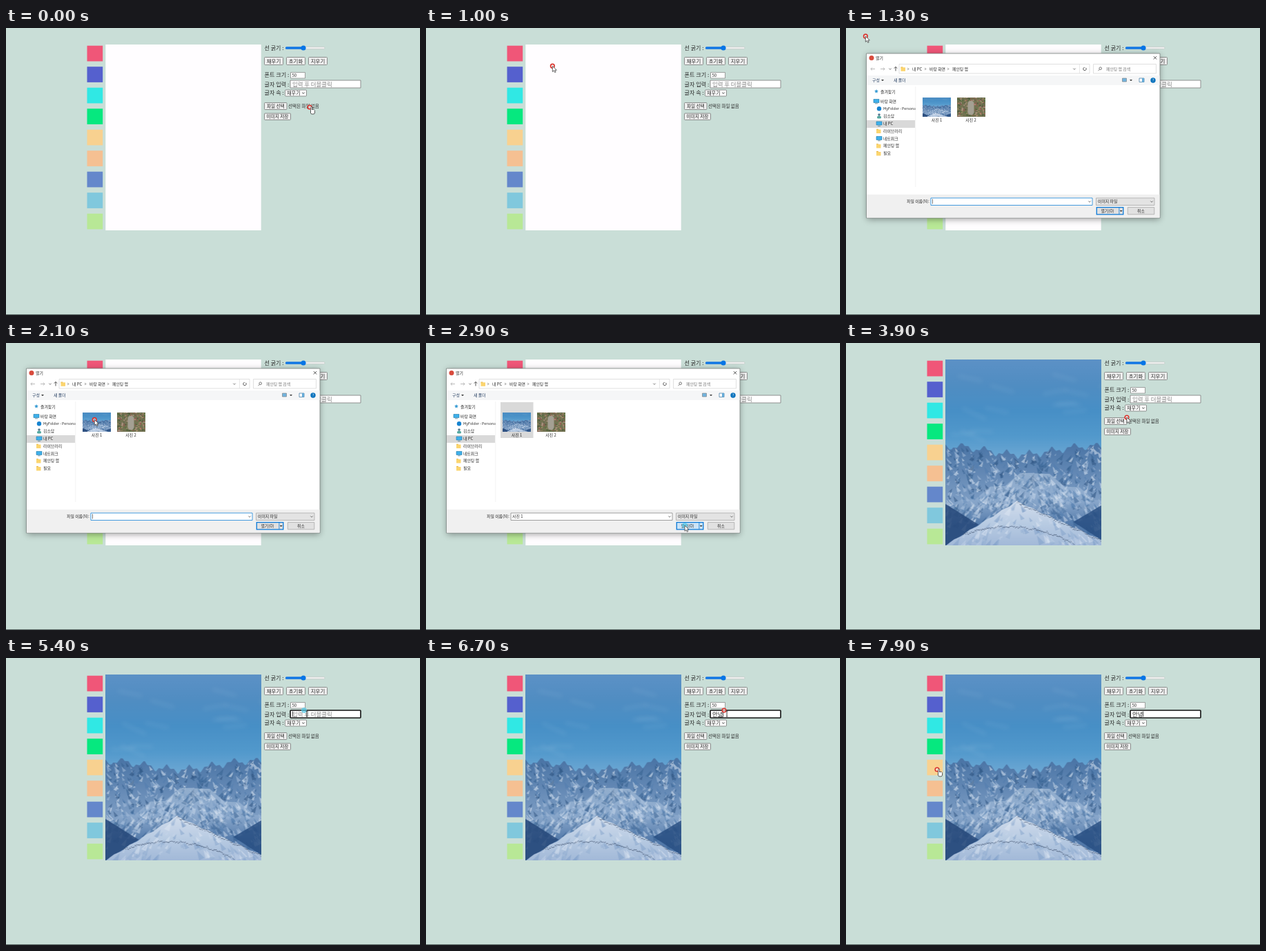
Write an HTML page with a canvas that moves like this. It is 600x417 px and loops after 8 s.

```html
<!DOCTYPE html>
<html lang="ko">
<head>
<meta charset="utf-8">
<title>그림판</title>
<style>
html, body { margin: 0; width: 100%; height: 100%; overflow: hidden; background: #c9ded7; }
canvas { display: block; }
</style>
</head>
<body>
<canvas id="stage" width="600" height="417"></canvas>
<script>
const LOOP = 8000;
const FONT = '"Noto Sans CJK KR", "Noto Sans CJK", "Noto Sans", sans-serif';
const INK = '#2a2a2a';
const SMALL = 5.9;
const SWATCHES = ['#f05678', '#5560ce', '#30e8e4', '#06e87f', '#f8d190',
  '#f5c092', '#6487cb', '#80c8dd', '#b8e896'];
const KEYSTROKES = ['ㅇ', '아', '안', '안ㄴ', '안녀', '안녕'];

const DIALOG_OPEN = 1100, SELECT = 2300, PRESS = 2800, DIALOG_CLOSE = 3100, LOADED = 3200;
const FOCUS = 5300, FIRST_SYLLABLE = 6000, SECOND_SYLLABLE = 6500, LEAVE = 7200;
const CLICKS = [700, SELECT, PRESS + 100, FOCUS + 100];

// Pointer stops; each leg decelerates into its stop.
const STOPS = [
  { at: 0, x: 440, y: 115 },
  { at: 800, x: 390, y: 113 },
  { at: 1400, x: 18, y: 9 },
  { at: 2200, x: 130, y: 113 },
  { at: 2900, x: 375, y: 265 },
  { at: 3900, x: 407, y: 108 },
  { at: FOCUS, x: 432, y: 76 },
  { at: LEAVE, x: 432, y: 76 },
  { at: 7900, x: 132, y: 162 }
];

const stage = document.getElementById('stage').getContext('2d');
let ctx = stage;

function paint(fill, line, width = 0.8) {
  if (fill) { ctx.fillStyle = fill; ctx.fill(); }
  if (line) { ctx.strokeStyle = line; ctx.lineWidth = width; ctx.stroke(); }
}

function rect(x, y, w, h, fill, line, width, radius = 0) {
  ctx.beginPath();
  ctx.roundRect(x, y, w, h, radius);
  paint(fill, line, width);
}

function dot(x, y, r, fill, line, width) {
  ctx.beginPath();
  ctx.arc(x, y, r, 0, Math.PI * 2);
  paint(fill, line, width);
}

function shape(points, fill, line, width) {
  ctx.beginPath();
  points.forEach(([x, y]) => ctx.lineTo(x, y));
  if (fill) ctx.closePath();
  paint(fill, line, width);
}

function text(str, x, y, size, color = INK, align = 'left') {
  ctx.font = `${size}px ${FONT}`;
  ctx.textAlign = align;
  ctx.fillStyle = color;
  ctx.fillText(str, x, y + size * 0.36);
}

function chevron(x, y, turn = 0, s = 1.7, color = '#555') {
  ctx.save();
  ctx.translate(x, y);
  ctx.rotate(turn * Math.PI / 2);
  shape([[-s, -s / 2], [0, s / 2], [s, -s / 2]], null, color, 0.8);
  ctx.restore();
}

function arrow(x, y, turn, color) {
  ctx.save();
  ctx.translate(x, y);
  ctx.rotate(turn * Math.PI / 2);
  shape([[0, -3], [0, 3]], null, color);
  ctx.restore();
  const reach = turn * Math.PI / 2;
  chevron(x - Math.sin(reach) * 2, y + Math.cos(reach) * 2, turn, 2.2, color);
}

const triangle = (x, y, s = 2) => shape([[x - s, y - s / 2], [x + s, y - s / 2], [x, y + s / 2]], INK);

function gradient(y0, y1, ...colors) {
  const g = ctx.createLinearGradient(0, y0, 0, y1);
  colors.forEach((c, i) => g.addColorStop(i / (colors.length - 1), c));
  return g;
}

function picture(w, h, draw) {
  const c = document.createElement('canvas');
  c.width = w;
  c.height = h;
  ctx = c.getContext('2d');
  let seed = 4721;
  draw(() => (seed = (seed * 16807) % 2147483647) / 2147483647, w, h);
  ctx = stage;
  return c;
}

const mountains = picture(225, 270, (random, w, h) => {
  const wave = u => Math.abs((((u % 1) + 1) % 1) * 2 - 1);
  const ridge = x => 139 + 6 * Math.cos((x - 108) / 32) - 10 * wave((x - 153) / 32) - 4 * wave(x / 11);
  const spur = x => 156 + Math.abs(x - 128) * 0.45 + 9 * wave(x / 43);
  const dome = x => 205 + (x < 103 ? (103 - x) * 0.62 : (x - 103) * 0.46) + 2 * wave(x / 23);
  const rim = x => 240 + (x - 90) ** 2 / 360 + 2 * wave(x / 17);

  function layer(top, fill) {
    const points = [[0, h]];
    for (let x = 0; x <= w; x++) points.push([x, top(x)]);
    shape([...points, [w, h]], fill);
  }

  function facets(top, count, depth, size, colors) {
    for (let i = 0; i < count; i++) {
      const x = random() * w;
      const y = top(x) + random() * depth;
      const len = size * (0.4 + random());
      const side = top(x + 1) > top(x) ? len : -len;
      shape([[x, y], [x + side, y + len], [x + side * 0.3, y + len * 1.3]],
        colors[Math.floor(random() * colors.length)]);
    }
  }

  function rocks(top, from, to) {
    for (let x = from; x < to; x += 1.3) rect(x, top(x) + random() * 3, 1 + random(), 0.9, '#4b5d78');
  }

  rect(0, 0, w, 160, gradient(0, 150, '#5c91c6', '#508dc2', '#478fc6', '#5299cc', '#73abd5'));
  ctx.filter = 'blur(3px)';
  ctx.globalAlpha = 0.09;
  for (let i = 0; i < 14; i++) {
    const x = random() * w, y = 20 + random() * 90;
    shape([[x, y], [x + 35, y + 25 * (random() - 0.3)]], null, '#e3f0fa', 4);
  }
  ctx.filter = 'none';

  ctx.globalAlpha = 1;
  layer(ridge, gradient(125, 250, '#4b75a6', '#6489b5', '#7f9fc5', '#6086b5'));
  ctx.globalAlpha = 0.55;
  facets(ridge, 650, 85, 6, ['#dbe6f2', '#a5bedb', '#527dae', '#35608f', '#2b527f']);
  ctx.globalAlpha = 0.45;
  layer(spur, gradient(156, 240, '#d4e2f0', '#a8c1de', '#3c6598'));
  facets(spur, 320, 55, 7, ['#e2ecf6', '#bdd1e8', '#537eaf', '#315a8b']);
  ctx.globalAlpha = 0.85;
  shape([[0, 210], [48, 240], [0, h]], '#27497b');
  shape([[w, 212], [185, 236], [w, 262]], '#294f83');
  ctx.globalAlpha = 1;
  layer(dome, gradient(205, h, '#d2ddec', '#b9cce3', '#a2b9d8'));
  ctx.globalAlpha = 0.4;
  facets(dome, 140, 42, 8, ['#e7eef7', '#c8d8ea', '#8ba9cf', '#7396c2']);
  ctx.globalAlpha = 0.8;
  rocks(dome, 103, w);
  rocks(rim, 25, 190);
});

const meadow = picture(41, 28, (random, w, h) => {
  rect(0, 0, w, h, '#727251');
  const colors = ['#a84f52', '#4f713d', '#b99d77', '#d2a4a0', '#394d36'];
  for (let i = 0; i < 200; i++) dot(random() * w, random() * h, 0.8, colors[i % colors.length]);
  rect(16, 5, 9, 20, '#a4a093', null, 0, 4);
});

function button(label, x, y, w, h, size) {
  rect(x + 0.5, y + 0.5, w - 1, h - 1, '#efefef', '#777', 0.8, 1);
  text(label, x + w / 2, y + h / 2, size, INK, 'center');
}

function drawPage(t) {
  rect(0, 0, 600, 417, '#c9ded7');
  rect(0, 416, 600, 1, '#52605c');
  SWATCHES.forEach((color, i) => rect(117.5, 25.7 + i * 30.5, 22.7, 22.7, color));
  rect(144.3, 24, 225.4, 270, '#fffdff');
  if (t >= LOADED) ctx.drawImage(mountains, 144.3, 24, 225.4, 270);

  text('선 굵기 :', 374.5, 29, 8);
  rect(405, 27.5, 57, 3, '#efefef', '#b7bdbb', 0.5, 1.5);
  rect(405, 27.3, 26, 3.4, '#1277e5', null, 0, 1.5);
  dot(431, 29, 3.6, '#0875e6');
  ['채우기', '초기화', '지우기'].forEach((label, i) => button(label, 374 + i * 32, 42, 28, 12, 7.4));

  text('폰트 크기 :', 374.5, 68.5, 8.1);
  rect(412.5, 64.5, 21, 8.5, '#fff', '#8b8b8b');
  text('50', 414.5, 69, 6);
  text('글자 입력 :', 374.5, 82, 8.1);
  drawInput(t);
  text('글자 속 :', 374.5, 94.5, 8.1);
  rect(404.5, 90, 31, 9, '#fff', '#777', 0.8, 1);
  text('채우기', 407, 94.5, 7.2);
  chevron(431, 94.5, 0, 1.8, '#111');

  button('파일 선택', 374, 108, 33.5, 11, 6.6);
  text('선택된 파일 없음', 409, 114, 6.5);
  button('이미지 저장', 374, 123.5, 39, 10.5, 6.6);
}

function typedAt(t) {
  const key = t < SECOND_SYLLABLE
    ? Math.min(3, (t - FIRST_SYLLABLE) / 100)
    : Math.min(5, 4 + (t - SECOND_SYLLABLE) / 100);
  return KEYSTROKES[key] || '';
}

function drawInput(t) {
  const focused = t >= FOCUS;
  const typed = typedAt(t);
  rect(412, 76, 102, 11, '#fff', focused ? '#111' : '#858585', focused ? 1.6 : 0.9, focused ? 1 : 0);
  text(typed || '입력 후 더블클릭', 415, 81.5, 8.4, typed ? INK : '#858585');
  if (!focused) return;
  const end = 415 + (typed && ctx.measureText(typed).width);
  if (typed && t < LEAVE) rect(end - 7.7, 85, 7.7, 0.7, INK);
  if (typed || t < FOCUS + 400) rect(end, 77.5, 0.8, 8, INK);
}

function folder(x, y) {
  rect(x, y - 3, 3, 2, '#e8b646');
  rect(x, y - 2.2, 6.5, 5.5, '#fbd56f');
}

function monitor(x, y) {
  rect(x, y - 3, 8, 5, '#3eb0ea', '#247ba8', 0.6);
  rect(x + 2, y + 3, 4, 0.8, '#4d7890');
}

function person(x, y) {
  dot(x + 4, y - 2, 1.8, '#547c91');
  rect(x + 1, y, 6, 3.5, '#54a8a0', null, 0, 1.5);
}

function star(x, y) {
  const points = Array.from({ length: 10 }, (_, i) => {
    const r = i % 2 ? 1.4 : 3, a = i * Math.PI / 5;
    return [x + 4 + r * Math.sin(a), y - r * Math.cos(a)];
  });
  shape(points, '#369bd3');
}

const disc = (x, y) => dot(x + 4, y, 3.2, '#1683d0');

const PLACES = [
  ['바탕 화면', monitor], ['MyFolder - Persona', disc], ['김소담', person], ['내 PC', monitor],
  ['라이브러리', folder], ['네트워크', monitor], ['페인팅 앱', folder], ['필요', folder]
];

function drawSidebar() {
  rect(30, 134, 70, 11, '#d9d9d9');
  rect(100.5, 85, 0.7, 146, '#eee');
  ctx.save();
  ctx.beginPath();
  ctx.rect(30, 84, 70.5, 110);
  ctx.clip();
  star(40, 92);
  text('즐겨찾기', 50, 92.5, SMALL);
  PLACES.forEach(([label, icon], i) => {
    const y = 106.5 + i * 10.8, indent = i ? 4 : 0;
    icon(40 + indent, y);
    text(label, 50 + indent, y, icon === disc ? 5.3 : SMALL);
  });
  ctx.restore();
}

function drawToolbars() {
  dot(37, 43.5, 3.5, '#d84b3d');
  text('열기', 43, 43.5, SMALL);
  [1, -1].forEach(d => shape([[448 - 2.2, 43.3 - 2.2 * d], [448 + 2.2, 43.3 + 2.2 * d]], null, INK));

  arrow(39, 59.5, 1, '#aaa');
  arrow(53, 59.5, -1, '#aaa');
  chevron(64, 59.5);
  arrow(72, 59.5, 2, INK);
  rect(77, 52.5, 276, 13.5, '#fff', '#d9d9d9');
  folder(79.5, 59.5);
  [['내 PC', 96], ['바탕 화면', 121], ['페인팅 앱', 154]].forEach(([label, x]) => {
    chevron(x - 6, 59.5, -1, 1.5);
    text(label, x, 59.5, SMALL);
  });
  chevron(331, 59.5);
  rect(338, 53, 0.7, 13, '#ddd');
  ctx.beginPath();
  ctx.arc(346, 59.5, 2.2, -0.9, 4.6);
  paint(null, INK);
  rect(358.5, 52.5, 91, 13.5, '#fff', '#d9d9d9');
  dot(368.7, 58.7, 1.8, null, '#555');
  shape([[367.4, 60.2], [365.5, 62.2]], null, '#555');
  text('페인팅 앱 검색', 377, 59.5, SMALL, '#777');

  rect(30, 69, 424.5, 14, '#f5f6f7');
  text('구성', 38, 76, SMALL, '#253e61');
  triangle(53, 76);
  text('새 폴더', 69, 76, SMALL, '#253e61');
  rect(400.5, 73, 6, 5, '#72b5df', '#777', 0.6);
  triangle(413, 76);
  rect(425, 73, 7, 5.5, '#fff', '#4a82a8');
  rect(429, 73, 3, 5.5, '#64abd8');
  dot(445, 76, 3.7, '#0872bd');
  text('?', 445, 76, 5.5, '#fff', 'center');
}

function drawFooter(selected, pressing) {
  rect(30, 242, 424.5, 33.5, '#f0f0f0');
  text('파일 이름(N):', 88, 252, SMALL);
  rect(123, 247, 234, 10.5, '#fff', selected ? '#888' : '#1683d8');
  if (selected) text('사진 1', 125, 252.2, SMALL);
  else rect(125, 248.5, 0.6, 7, INK);
  chevron(353, 252.3);
  rect(362.5, 247, 84.5, 10.5, '#e3e3e3', '#aaa');
  text('이미지 파일', 365, 252.2, SMALL);
  chevron(443, 252.3);
  rect(363.3, 260.6, 38.5, 10.2, pressing ? '#cce4f7' : '#e1e1e1', '#0878d7', 1.3);
  rect(395.5, 260.6, 0.8, 10.2, '#0878d7');
  text('열기(O)', 379, 265.7, SMALL, INK, 'center');
  triangle(398.7, 266);
  rect(408.3, 260.6, 38.5, 10.2, '#e1e1e1', '#aaa');
  text('취소', 427.5, 265.7, SMALL, INK, 'center');
}

function drawDialog(t) {
  const selected = t >= SELECT;
  const pressing = t >= PRESS;
  ctx.save();
  ctx.shadowColor = 'rgba(0,0,0,.38)';
  ctx.shadowBlur = 9;
  ctx.shadowOffsetY = 2;
  rect(29.5, 37, 425.5, 239, '#fff');
  ctx.restore();
  rect(29.5, 37, 425.5, 239, null, '#7b8582');
  drawToolbars();
  drawSidebar();
  if (selected) rect(108, 86, 47.5, 52, pressing ? '#d9d9d9' : '#cce8ff');
  ctx.drawImage(mountains, 0, 45, 225, 205, 111, 101, 41, 28);
  ctx.drawImage(meadow, 160.5, 101);
  text('사진 1', 131.5, 133.5, SMALL, INK, 'center');
  text('사진 2', 181, 133.5, SMALL, INK, 'center');
  drawFooter(selected, pressing);
}

function pointerAt(t) {
  const next = STOPS.findIndex(stop => stop.at > t);
  if (next < 0) return STOPS.at(-1);
  const a = STOPS[next - 1], b = STOPS[next];
  const ease = 1 - ((b.at - t) / (b.at - a.at)) ** 2;
  return { x: a.x + (b.x - a.x) * ease, y: a.y + (b.y - a.y) * ease };
}

const POINTERS = {
  arrow() {
    shape([[0, 0], [0, 8.3], [2, 6.5], [3.4, 9.4], [4.8, 8.7], [3.5, 6], [6, 6]], '#fff', INK, 0.7);
  },
  hand() {
    rect(1.5, 3.5, 6, 6.5, '#fff', INK, 0.8, 2);
    rect(1.7, -0.5, 1.9, 7, '#fff', INK, 0.7, 1);
    rect(2, 4, 5, 5, '#fff');
  },
  beam() {
    rect(3.6, 1, 0.9, 8, INK);
    [0.7, 8.7].forEach(y => rect(2.6, y, 2.9, 0.7, INK));
  }
};

function pointerKind({ x, y }, dialog) {
  const inside = (l, t, r, b) => x > l && x < r && y > t && y < b;
  if (dialog) return 'arrow';
  if (inside(411, 75, 515, 88)) return 'beam';
  return inside(117, 25, 141, 293) || inside(374, 109, 455, 120) ? 'hand' : 'arrow';
}

function drawPointer(t, dialog) {
  const spot = pointerAt(t);
  ctx.save();
  ctx.translate(spot.x, spot.y);
  if (CLICKS.some(at => Math.abs(t - at) <= 100)) dot(0, 0, 3.5, 'rgba(80,205,235,.65)', '#62c9e5');
  else dot(0, 0, 2.8, 'rgba(255,235,230,.6)', '#d9352f', 1.6);
  POINTERS[pointerKind(spot, dialog)]();
  ctx.restore();
}

function render(now) {
  const t = Math.floor((now % LOOP) / 100) * 100;
  const dialog = t >= DIALOG_OPEN && t < DIALOG_CLOSE;
  drawPage(t);
  if (dialog) drawDialog(t);
  drawPointer(t, dialog);
}

let start;
function tick(now) {
  start ??= now;
  render(now - start);
  requestAnimationFrame(tick);
}
render(0);
requestAnimationFrame(tick);
</script>
</body>
</html>
```
